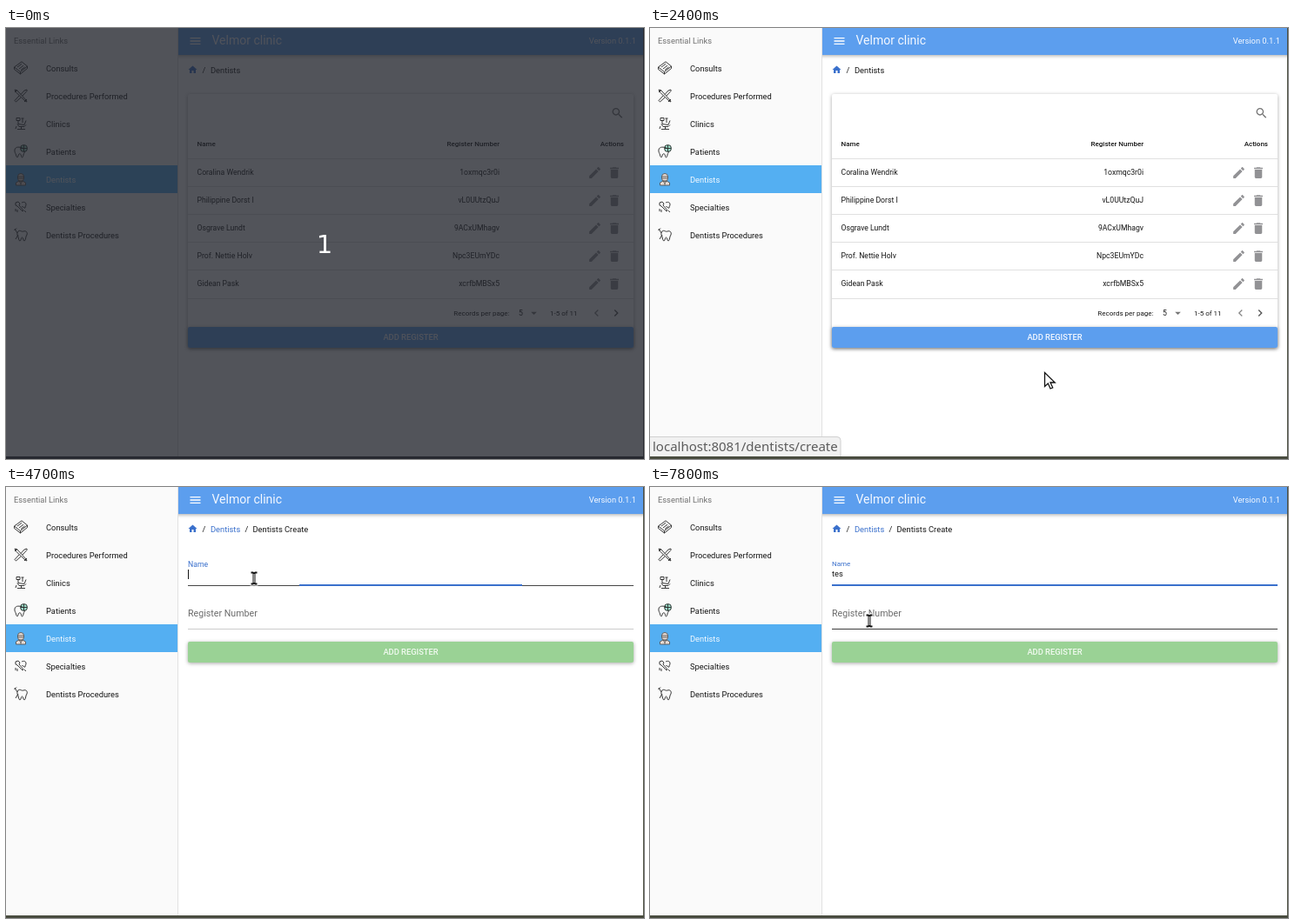
Animation of 733 by 496 pixels, one loop 8000 ms. Source, as an HTML page with a canvas:

```html
<!DOCTYPE html>
<html lang="en">
<head>
<meta charset="utf-8">
<title>Clinic admin</title>
<style>
html, body { margin: 0; width: 100%; height: 100%; overflow: hidden; background: #fff; }
canvas { display: block; width: 733px; height: 496px; }
</style>
</head>
<body>
<canvas id="stage" width="733" height="496"></canvas>
<script>
const ctx = document.getElementById('stage').getContext('2d');
const LOOP = 8000, STEP = 100;
const BLUE = '#5c9eee', LINK = '#3a70cc', RED = '#b00020', INK = '#161616';

const GLYPH = {
  menu: 'M3 18h18v-2H3v2zm0-5h18v-2H3v2zm0-7v2h18V6H3z',
  home: 'M10 20v-6h4v6h5v-8h3L12 3 2 12h3v8z',
  search: 'M15.5 14h-.79l-.28-.27C15.41 12.59 16 11.11 16 9.5 16 5.91 13.09 3 9.5 3S3 5.91 3 9.5 5.91 16 9.5 16c1.61 0 3.09-.59 4.23-1.57l.27.28v.79l5 4.99L20.49 19l-4.99-5zm-6 0C7.01 14 5 11.99 5 9.5S7.01 5 9.5 5 14 7.01 14 9.5 11.99 14 9.5 14z',
  edit: 'M3 17.25V21h3.75L17.81 9.94l-3.75-3.75L3 17.25zM20.71 7.04c.39-.39.39-1.02 0-1.41l-2.34-2.34c-.39-.39-1.02-.39-1.41 0l-1.83 1.83 3.75 3.75 1.83-1.83z',
  trash: 'M6 19c0 1.1.9 2 2 2h8c1.1 0 2-.9 2-2V7H6v12zM19 4h-3.5l-1-1h-5l-1 1H5v2h14V4z',
  left: 'M15.41 7.41L14 6l-6 6 6 6 1.41-1.41L10.83 12z',
  right: 'M10 6L8.59 7.41 13.17 12l-4.58 4.59L10 18l6-6z',
  drop: 'M7 10l5 5 5-5z',
  error: 'M12 2C6.48 2 2 6.48 2 12s4.48 10 10 10 10-4.48 10-10S17.52 2 12 2zm1 15h-2v-2h2v2zm0-4h-2V7h2v6z'
};

// Line icons on a 16 px grid; the optional tint is drawn beneath the strokes.
const MENU = [
  { label: 'Consults', line: 'M.5 7L9 .8 15.5 6 7.5 12.5ZM.5 7v2.5L7.5 15l8-6.5V6M4 7l5-3.7M6 9l5-3.8M8 10.5l4.5-3.5M7.5 12.5V15' },
  { label: 'Procedures Performed', line: 'M1 1l3 1 10 11 1 2-2-1L2.5 4ZM15 1l-3 1-4 4.5M10 8l5-5.5V1M6 8L1 13.5 2.5 15 8 10M1 4l3-3M12 15l3-3' },
  { label: 'Clinics', line: 'M3 1.5h4v3H3ZM5 4.5v4l7 1 2-5M4 8.5l2 3h6l2-2M8.5 11.5V14M4 14.5h9M10 2v5M8.5 2h3M3 11l-1 3' },
  { label: 'Patients', line: 'M10 4C7 3 2 2 1 6c-.5 3 1 4 1.5 6 .5 3 2 4 2.5 1 .5-3 3-3 3.5 0 .5 3 2 2.500 2.500-1 .5-2 1.500-2.500 1.700-4M15.500 4.500a4 4 0 1 1-8 0a4 4 0 1 1 8 0M8 4.500h7M11.500 1v7', tint: 'M15.500 4.500a4 4 0 1 1-8 0a4 4 0 1 1 8 0Z', color: '#9fe0cb' },
  { label: 'Dentists', line: 'M4.500 5a3.500 3.500 0 1 1 7 0v2a3.500 3.500 0 0 1-7 0ZM4.500 5h7M2.500 15v-3l3.500-2h4l3.500 2v3ZM6 10l2 3 2-3M5 7h6M8 13v2', tint: 'M4.500 5a3.500 3.500 0 1 1 7 0v2a3.500 3.500 0 0 1-7 0ZM2.500 15v-3l3.500-2h4l3.500 2v3Z', color: '#e8dcd5' },
  { label: 'Specialties', line: 'M2 3l3-1 2 2-1 2 5 6-1 1-6-6-2-1ZM9 3c2-1 5-1 5 2 0 2-1 2-1 4-1 1-1-1-2-1-1 0-1 0-2-1M2 10v3M4 11v3M12 12l2 2' },
  { label: 'Dentists Procedures', line: 'M5 4c2-2 4 1 6 0 3-1 5 1 4 4l-1 2c-.5 3-1 5-2 5-1.500 0-1-4-2.500-4S8.500 15 7 15c-1 0-1.500-2-2-5C3.500 8 3.500 6 5 4M1 1l3 5M.5 3L3 .5M5 8L2 13' }
];
const ROWS = [
  ['Coralina Wendrik', '1oxmqc3r0i'], ['Philippine Dorst I', 'vL0UUtzQuJ'], ['Osgrave Lundt', '9ACxUMhagv'],
  ['Prof. Nettie Holv', 'Npc3EUmYDc'], ['Gidean Pask', 'xcrfbMBSx5']
];

// Pointer stops: time, x, y.
const PATH = [
  [600, 420, 300], [1300, 70, 180], [1500, 66, 176], [1700, 67, 177], [2200, 440, 330], [2300, 448, 360],
  [2400, 453, 396], [2600, 466, 358], [3100, 466, 358], [3700, 285, 105], [5000, 285, 105], [5300, 284, 358],
  [5500, 285, 341], [5600, 285, 341], [5900, 284, 178], [6100, 282, 105], [7400, 282, 105], [7700, 252, 154]
];

const clamp = v => Math.max(0, Math.min(1, v));
const ease = v => v * v * (3 - 2 * v);
const ramp = (t, from, span) => ease(clamp((t - from) / span));
const mix = (a, b, k) => a + (b - a) * k;

function rect(x, y, w, h, color) {
  ctx.fillStyle = color;
  ctx.fillRect(x, y, w, h);
}

function panel(x, y, w, h, color) {
  ctx.save();
  ctx.shadowColor = 'rgba(0,0,0,.35)';
  ctx.shadowBlur = 4;
  ctx.shadowOffsetY = 1;
  ctx.fillStyle = color;
  ctx.beginPath();
  ctx.roundRect(x, y, w, h, 2);
  ctx.fill();
  ctx.restore();
}

function text(s, x, y, size, color = INK, align = 'left', weight = 400, family = 'Roboto') {
  ctx.font = `${weight} ${size}px "${family}", sans-serif`;
  ctx.textAlign = align;
  ctx.fillStyle = color;
  ctx.fillText(s, x, y);
}

function glyph(name, cx, cy, size, color) {
  ctx.save();
  ctx.translate(cx - size / 2, cy - size / 2);
  ctx.scale(size / 24, size / 24);
  ctx.fillStyle = color;
  ctx.fill(new Path2D(GLYPH[name]));
  ctx.restore();
}

function pointerAt(t) {
  if (t < PATH[0][0]) return null;
  const i = PATH.findIndex(p => p[0] > t);
  if (i < 0) return PATH[PATH.length - 1].slice(1);
  const [t0, x0, y0] = PATH[i - 1], [t1, x1, y1] = PATH[i];
  const k = ease((t - t0) / (t1 - t0));
  return [mix(x0, x1, k), mix(y0, y1, k)];
}

const inside = (p, x, y, w, h) => !!p && p[0] >= x && p[0] < x + w && p[1] >= y && p[1] < y + h;

function sidebar(p) {
  rect(0, 0, 197, 493, '#fafafa');
  rect(197, 0, 1, 493, '#e2e2e2');
  text('Essential Links', 9, 18, 9.33, '#707070');
  MENU.forEach((item, i) => {
    const y = 30 + i * 32, active = i === 4, hover = inside(p, 0, y, 197, 32);
    if (active) rect(0, y, 197, 32, hover ? '#6eb9f3' : '#54aff2');
    else if (hover) rect(0, y, 197, 32, '#ececec');
    ctx.save();
    ctx.translate(9, y + 8);
    if (item.tint) {
      ctx.fillStyle = item.color;
      ctx.fill(new Path2D(item.tint));
    }
    ctx.strokeStyle = active ? '#555' : '#252525';
    ctx.lineWidth = .9;
    ctx.stroke(new Path2D(item.line));
    ctx.restore();
    text(item.label, 46, y + 20, 9.33, active ? '#f4faff' : INK);
  });
}

function header() {
  ctx.save();
  ctx.beginPath();
  ctx.rect(198, 0, 535, 50);
  ctx.clip();
  panel(190, -5, 560, 36, BLUE);
  ctx.restore();
  glyph('menu', 217.5, 15, 16, '#fff');
  text('Velmor clinic', 236.5, 19, 14, '#f4f8ff');
  text('Version 0.1.1', 724, 18, 9.33, '#f4f8ff', 'right');
}

function crumbs(create) {
  glyph('home', 214.5, 48, 12, LINK);
  text('/', 225.5, 52, 9.33);
  text('Dentists', 235, 52, 9.33, create ? LINK : INK);
  if (!create) return;
  text('/', 274.5, 52, 9.33);
  text('Dentists Create', 283.5, 52, 9.33);
}

function list(p) {
  panel(209, 76, 512, 292, '#fff');
  glyph('search', 702.5, 98, 16, '#757575');
  text('Name', 219.5, 136, 8, INK, 'left', 500);
  text('Register Number', 567, 136, 8, INK, 'right', 500);
  text('Actions', 710, 136, 8, INK, 'right', 500);
  rect(209, 150, 512, 1, '#e0e0e0');
  ROWS.forEach(([name, code], i) => {
    const y = 151 + i * 32;
    if (inside(p, 209, y, 512, 31)) rect(209, y, 512, 31, '#f7f7f7');
    text(name, 219.5, y + 18, 8.67);
    text(code, 567, y + 18, 8.67, INK, 'right');
    glyph('edit', 676.5, y + 15.5, 17, '#929295');
    glyph('trash', 699, y + 15.5, 17, '#929295');
    rect(209, i < 4 ? y + 31 : 311, 512, 1, '#e0e0e0');
  });
  text('Records per page:', 578.5, 330.5, 8, INK, 'right');
  text('5', 589, 331, 8.67);
  glyph('drop', 606.5, 328, 16, '#757575');
  text('1-5 of 11', 625, 330.5, 8);
  glyph('left', 678.5, 328, 16, '#8a8a8a');
  glyph('right', 701, 328, 16, '#555');
  panel(209, 344, 512, 24, inside(p, 209, 344, 512, 24) ? '#70aaf0' : BLUE);
  text('ADD REGISTER', 465, 359, 9.33, '#f4f8ff', 'center', 500);
}

function form(t) {
  const float = ramp(t, 4500, 300), focus = ramp(t, 4500, 400);
  const failed = t >= 5300 && t < 6800;
  const accent = failed ? RED : LINK;
  const typed = 'tes'.slice(0, t < 6800 ? 0 : t < 7000 ? 1 : t < 7200 ? 2 : 3);

  text('Name', 209, mix(98, 90.5, float), mix(10.67, 8, float), float > 0 ? accent : '#6c6c6c');
  const shade = Math.round(mix(194, 70, ramp(t, 3500, 300)));
  rect(209, 113, 512, 1, `rgb(${shade},${shade},${shade})`);
  if (focus > 0) rect(465 - 256 * focus, 112, 512 * focus, 2, accent);
  text(typed, 209, 103, 9.33);
  const since = t >= 7200 ? t - 7200 : t >= 6800 ? 0 : t >= 6300 ? t - 6300 : t - 4600;
  const focused = t >= 4600 && t < 5300 || t >= 6300;
  if (focused && since % 1000 < 500) {
    rect(209 + Math.ceil(ctx.measureText(typed).width), 95, 1, 11, INK);
  }
  if (failed) glyph('error', 713, 95, 16, RED);

  text('Register Number', 209, 149, 10.67, '#6c6c6c');
  const dark = Math.round(mix(204, 60, ramp(t, 7500, 300)));
  rect(209, 163, 512, 1, `rgb(${dark},${dark},${dark})`);
  panel(209, 178, 512, 24, '#9ad295');
  text('ADD REGISTER', 465, 193, 9.33, '#f2faf1', 'center', 500);
}

function status(t) {
  const first = t < 2300;
  const alpha = first ? clamp((t - 1200) / 200) * clamp((2200 - t) / 300) : clamp((3400 - t) / 300);
  if (alpha <= 0) return;
  const w = first ? 176 : 219;
  ctx.save();
  ctx.globalAlpha = alpha;
  ctx.beginPath();
  ctx.roundRect(-4.5, 470.5, w + 4.5, 30, 4);
  ctx.fillStyle = '#f1f1f1';
  ctx.fill();
  ctx.strokeStyle = '#d0d0d0';
  ctx.lineWidth = 1;
  ctx.stroke();
  text('localhost:8081/dentists/' + (first ? '' : 'create'), 3, 487, 15, '#5c5c5c', 'left', 400, 'Noto Sans');
  ctx.restore();
}

const SHAPES = {
  arrow: 'M.5 .5v16l3.800-3.500 2.700 6 2.700-1.200-2.700-5.800h5.200Z',
  hand: 'M-1.500 1c0-1.600 3-1.600 3 0v5c.5-1 2.500-.8 2.800.4.500-.9 2.300-.7 2.600.5.600-.7 2.300-.3 2.300 1v3c0 2-1.200 2.500-1.200 4.600h-8.500c0-2-3.500-4-4.200-6.500-.4-1.500 1.500-2 3.200.3Z',
  beam: 'M-3.500-7.500h2.500l1 .7 1-.7h2.500v2h-2v11h2v2H1l-1-.7-1 .7h-2.500v-2h2v-11h-2Z'
};

function pointer(p, create) {
  if (!p) return;
  const overField = create && (inside(p, 209, 78, 512, 36) || inside(p, 209, 128, 512, 36));
  const overLink = inside(p, 0, 30, 197, 224) || (!create && inside(p, 209, 344, 512, 24));
  const path = new Path2D(SHAPES[overField ? 'beam' : overLink ? 'hand' : 'arrow']);
  ctx.save();
  ctx.translate(Math.round(p[0]), Math.round(p[1]));
  if (overField) {
    ctx.strokeStyle = '#fff';
    ctx.lineWidth = 2;
    ctx.stroke(path);
    ctx.fillStyle = '#111';
    ctx.fill(path);
    rect(-.5, -5, 1, 10, '#fff');
  } else {
    ctx.fillStyle = '#fff';
    ctx.fill(path);
    ctx.strokeStyle = '#111';
    ctx.lineWidth = 1.3;
    ctx.stroke(path);
    if (overLink) ctx.stroke(new Path2D('M1.5 5v4M4.300 6.500v3M6.900 7v3'));
  }
  ctx.restore();
}

function draw(t) {
  const create = t >= 2700, p = pointerAt(t);
  rect(0, 0, 733, 496, '#fff');
  sidebar(p);
  header();
  crumbs(create);
  if (create) form(t); else list(p);
  status(t);
  const frame = t < 1400 ? '#3a3b40' : '#494c3f';
  rect(0, 493, 733, 3, frame);
  rect(732, 0, 1, 496, frame);
  pointer(p, create);
  if (t < 500) {
    rect(0, 0, 733, 496, 'rgba(34,37,44,.78)');
    text('1', 366, 259, 29, '#fff', 'center', 400, 'DejaVu Sans');
  }
}

function tick(now) {
  draw(Math.floor(now % LOOP / STEP) * STEP);
  requestAnimationFrame(tick);
}
requestAnimationFrame(tick);
</script>
</body>
</html>
```
